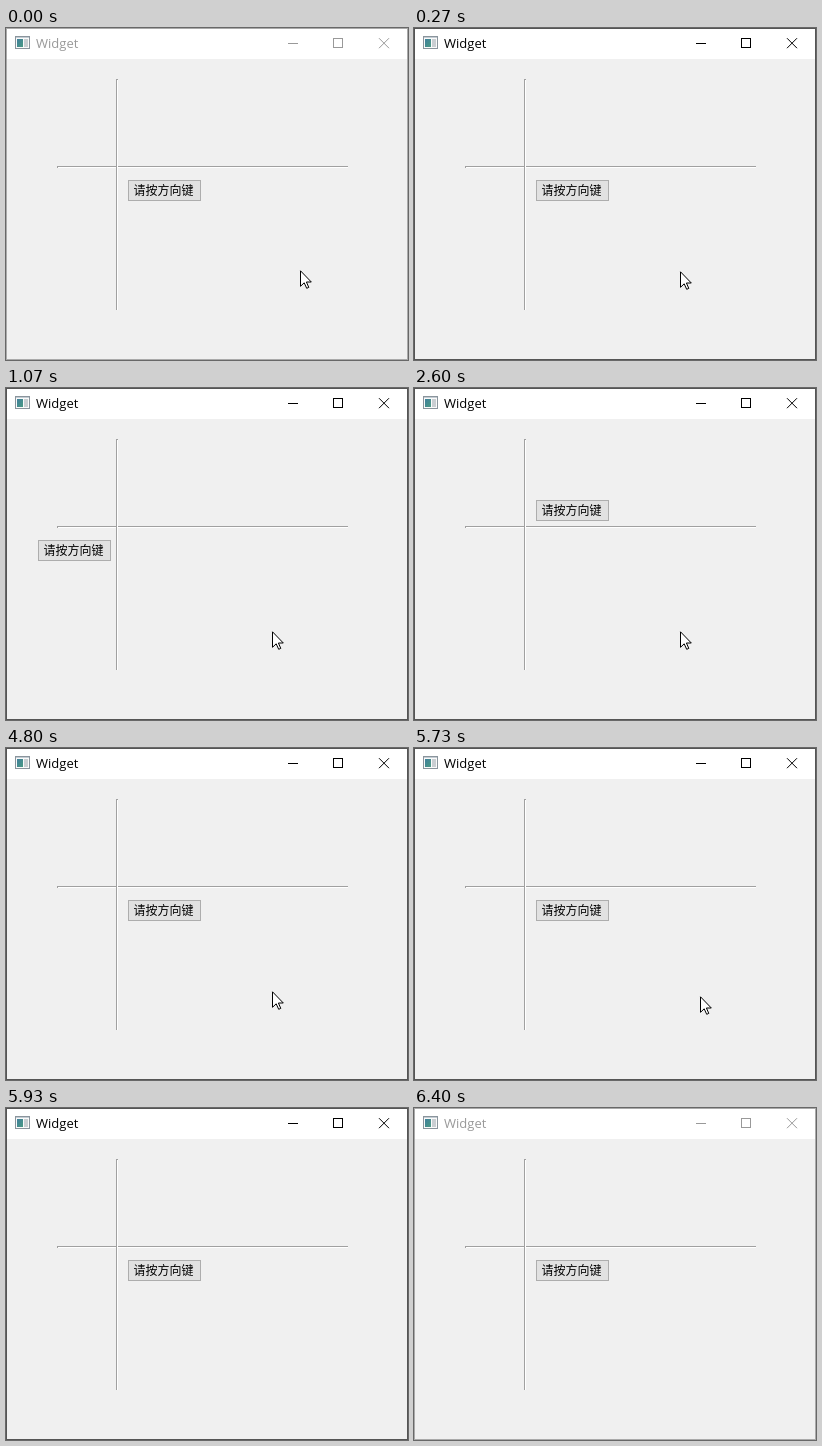
These frames come from a looping animation (402 by 332 pixels, 6540 ms). An HTML page:

```html
<!DOCTYPE html>
<html lang="zh">
<head>
<meta charset="utf-8">
<style>
  html, body { margin: 0; width: 100%; height: 100%; overflow: hidden; }
  svg { display: block; }
  .crisp { shape-rendering: crispEdges; }
  #title { font: 13px "Open Sans", "Noto Sans", sans-serif; }
  #button text { font: 12px "Noto Sans CJK SC", "Noto Sans CJK", sans-serif; }
</style>
</head>
<body>
<svg width="402" height="332" viewBox="0 0 402 332">
  <defs>
    <linearGradient id="pane" x2="1" y2="1">
      <stop stop-color="#3f7f9c"/>
      <stop offset="1" stop-color="#4a9a84"/>
    </linearGradient>
  </defs>
  <g class="crisp">
    <rect width="402" height="332" fill="#fff"/>
    <rect y="31" width="402" height="301" fill="#f0f0f0"/>
    <rect id="border" x=".5" y=".5" width="401" height="331" fill="none"/>
  </g>

  <g id="icon" class="crisp">
    <rect x="9.5" y="8.5" width="14" height="12" fill="#fafafa" stroke="#8a949c"/>
    <path d="M10 9.5H23" stroke="#c3ccd3"/>
    <rect x="11" y="11" width="6" height="8" fill="url(#pane)"/>
    <rect x="18" y="11" width="4" height="8" fill="#c9ced2"/>
  </g>
  <text id="title" x="30" y="20">Widget</text>
  <g id="controls" fill="none">
    <path class="crisp" d="M282 15.5H292M327.5 10.5H336.5V19.5H327.5Z"/>
    <path d="M373 10.2L383 20.2M383 10.2L373 20.2"/>
  </g>

  <g class="crisp">
    <path d="M51 138.5H342M51.5 138V140" stroke="#a0a0a0"/>
    <path d="M52 139.5H342" stroke="#fff"/>
    <path d="M110.5 51V282M110 51.5H112" stroke="#a0a0a0"/>
    <path d="M111.5 52V282" stroke="#fff"/>
  </g>

  <g id="button">
    <rect class="crisp" x=".5" y=".5" width="72" height="20" fill="#e1e1e1" stroke="#adadad"/>
    <text x="5.5" y="15">请按方向键</text>
  </g>

  <path id="cursor" d="M.5 .8V16.3L4.2 12.8L6.7 18.3L8.8 17.4L6.4 12H11.3Z" fill="#fff" stroke="#000"/>
</svg>
<script>
  const LOOP = 6540;
  const $ = id => document.getElementById(id);

  // Each entry: start time in ms, then the state held until the next entry.
  const buttonSteps = [[0, 122, 152], [1070, 32, 152], [2600, 122, 112], [3870, 32, 112], [4800, 122, 152]];
  const cursorSteps = [[0, 294, 242], [270, 266, 243], [5730, 286, 248], [5800, 334, 241], [5870, 386, 226], [5930, 500, 226]];

  function place(id, steps, t) {
    const [, x, y] = steps.filter(step => step[0] <= t).pop();
    $(id).setAttribute("transform", `translate(${x} ${y})`);
  }

  function draw() {
    const t = performance.now() % LOOP;
    const active = t >= 70 && t < 6400;
    $("border").setAttribute("stroke", active ? "#555" : "#aaa");
    $("title").setAttribute("fill", active ? "#000" : "#999");
    $("controls").setAttribute("stroke", active ? "#000" : "#999");
    place("button", buttonSteps, t);
    place("cursor", cursorSteps, t);
    requestAnimationFrame(draw);
  }
  draw();
</script>
</body>
</html>
```
